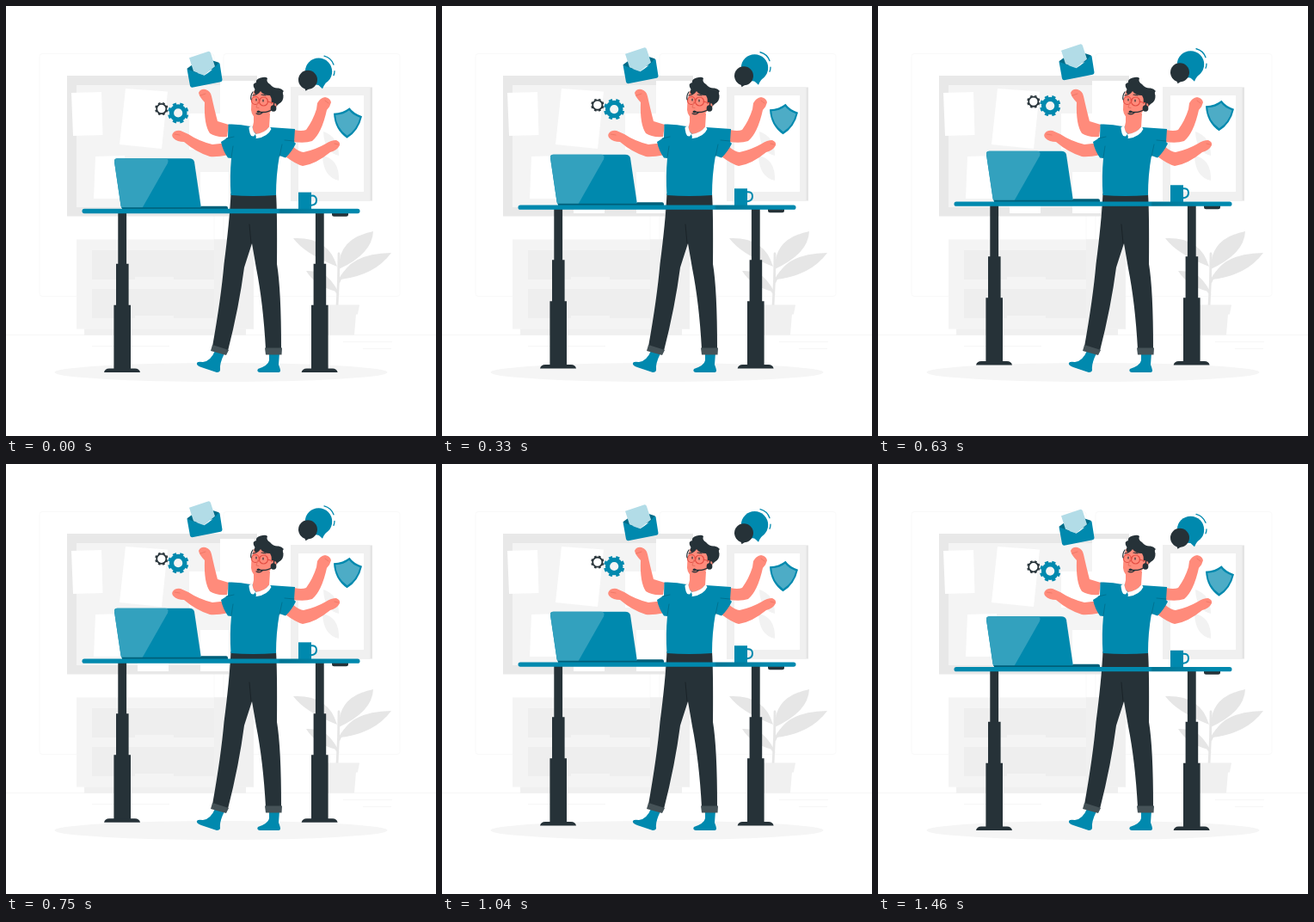
Recreate the animation shown at these times as an HTML page. Size 500x500 px, loop 1500 ms.

```html
<!DOCTYPE html>
<html lang="en">
<head>
<meta charset="utf-8">
<title>Standing desk</title>
<style>
  html, body { margin: 0; width: 100%; height: 100%; overflow: hidden; background: #fff; }
  svg { display: block; width: 100vw; height: 100vh; }
  .teal { fill: #0089ae; }
  .dark { fill: #263238; }
  .skin { fill: #ff8b7b; }
  .line { fill: none; stroke-linecap: round; stroke-linejoin: round; }
</style>
</head>
<body>
<svg viewBox="0 0 500 500">
  <defs>
    <linearGradient id="top" x1="0" x2="1">
      <stop offset=".705" stop-color="#0089ae"/>
      <stop offset=".715" stop-color="#007594"/>
      <stop offset=".92" stop-color="#0089ae"/>
    </linearGradient>
    <g id="leg" class="dark">
      <path d="M130.300 240h9.800v61h-9.800zM128 300h14.600v49H128zM125.400 348H145v75h-19.600z"/>
      <path d="M114 426.300q1-4.500 6-4.500h30q5 0 6 4.500z"/>
    </g>
  </defs>

  <g id="room">
    <g fill="none" stroke="#f7f7f7" stroke-width=".7">
      <path d="M42 55.500h197q3 0 3 3v276q0 3-3 3H42q-3 0-3-3v-276q0-3 3-3zM256 55.500h199q3 0 3 3v276q0 3-3 3H256q-3 0-3-3v-276q0-3 3-3z"/>
      <path d="M0 382.500h500M100 395.500h90M392 390.500h57M415 398.500h33" stroke="#f2f2f2"/>
    </g>
    <path fill="#e8e8e8" d="M71 81h221v163.500H71z"/>
    <path fill="#f4f4f4" d="M82 92h200v142H82z"/>
    <path fill="#fff" d="M76 101l35-1 1.500 50-34.500 1zM139 96l49 3.500-7 66.500-49-5zM104 175l34-1v50h-36zM153 193h36v48h-36zM226 193h33v48h-33zM213 125h45v42h-45zM249 87h40v52h-40z"/>
    <path fill="#e4e4e4" d="M331 94.500h95v132h-95z"/>
    <path fill="#f0f0f0" d="M331 94.500h92.500v132H331z"/>
    <path fill="#fff" d="M340 104h76v112h-76z"/>
    <path fill="#f2f2f2" d="M369 146q18 6 18 28-17-4-18-28zM368 174q20 4 19 29-18-4-19-29z"/>
    <path fill="#f4f4f4" d="M82 271.500h206v104H82zM91 375h188v7.500H91z"/>
    <path fill="#f0f0f0" d="M242 271.500h46v104h-46zM91 376h188v6.500H91z"/>
    <path fill="#eee" d="M100 284h142v34H100zM100 329h142v34H100z"/>
    <path fill="#f4f4f4" d="M150 315h45v3h-45zM150 360h45v3h-45z"/>
    <path class="line" stroke="#e6e6e6" stroke-width="2.800" d="M385 349q2-30 2-61M387 321q5-13 18-20M386 335q-8-18-24-26"/>
    <path fill="#e6e6e6" d="M387 306Q386 270 427 262 426 288 387 306zM389 318Q398 288 448 287 429 313 389 318zM385 303Q375 268 334 270 347 288 385 303zM384 332Q376 307 349 308 360 326 384 332z"/>
    <path fill="#f0f0f0" d="M358 347.500h53l-2 11H360zM362 358h45l-2 24.500h-41z"/>
    <ellipse cx="250" cy="426" rx="193.500" ry="11" fill="#f5f5f5"/>
  </g>

  <g id="person">
    <path class="teal" d="M243 401l11 3q-6 12-5 19 0 3-4 3-9-3-18-6-6-2-5-5 1-2 7-1 9-1 14-13zM306 403h12l-1 14q2 5 2 7 0 2-3 2h-21q-4-1-2-4 12-4 13-10z"/>
    <path class="dark" d="M261.500 218H314Q315.500 240 315 300 320 330 320 399H302Q299 345 291 305L286 276 277 304Q271 350 258 401L240 396Q250 340 253.500 300 260 250 261.500 218z"/>
    <path class="line" stroke="#1a2328" d="M285 276l-2-22"/>
    <path fill="#455257" d="M240 394l19 6-3 6-18-5zM301 397.500h20l-.5 8h-18.500z"/>

    <g class="skin">
      <path d="M224 101q2-5 8-4 6 2 7 8 4 18 7 29l13 4-2 14q-13 1-20-4-7-10-6-36-6-6-7-11z"/>
      <path d="M194 148q3-4 9-3l9 4q12 8 28 12l18-2 1 14q-15 3-22 2-16-5-30-17-8 0-12-4-3-3-1-6z"/>
      <path d="M362 113q3-6 9-7 6 1 7 6-1 5-5 9-6 27-17 36-8 3-22 1l1-14q9 2 14 0 8-11 12-24z"/>
      <path d="M372 160q6-4 12-4 5 2 4 6-3 6-11 8-17 14-32 16-8-2-20-11l8-12q8 7 13 7 14-3 26-10z"/>
    </g>
    <path class="line" stroke="#e8705f" stroke-width=".7" d="M226 104l6-2M196 149l6 1M371 110l4 3M382 160l4 1"/>

    <path class="teal" d="M258.500 137.500Q272 137 284 140L307 141 336 143 335 158 337 160Q332 170 325 176.500L318 174Q314 196 314 220 287 222 261.500 220 260 198 262 177L258 176.500Q252 168 250 158L258 153z"/>
    <path class="line" stroke="#006c89" stroke-width=".8" d="M256 154l9-2M262 176l2-13M335 157l-11-1M318 175l3-14"/>

    <path class="skin" d="M288 125h19l-1 16q-7 8-15 8l-5-5 2-9z"/>
    <path fill="#fff" d="M282.500 141l4-2q0 7 4 10 10-1 16-9l2 3q-4 9-17 11l-5-1q-4-5-4-12z"/>
    <path class="teal" d="M284 151l4 .5 2-2.500 1 4-2 2-4 1z"/>
    <path class="skin" d="M288 99Q299 95 309 104L310 119Q304 131 294 131 286 130 285 121 285 109 288 99z"/>
    <path class="dark" d="M291 103Q287 101 289.500 97 285 90 291 89 290 85 296 83.500 302 82 304 84 302 88 307 91 311 96 317 95.500 321 96 323 99 321 100 322.500 104 323 111 317 114L313 118 308 115Q310 109 307 104 299 104 296 99 293 103 291 103z"/>
    <circle class="skin" cx="311" cy="116" r="3.500"/>
    <g class="line" stroke="#e34d43" stroke-width="1.200">
      <circle cx="290" cy="110" r="4.500"/><circle cx="299.500" cy="111" r="5"/>
      <path d="M304 111l7 2M294 109l1 1"/>
    </g>
    <path class="line" stroke="#263238" stroke-width="1.200" d="M287 100q-3 4-2 9M287 104l4-1M297 103l5 1M291 108v2M299 109v2M291 125q4 2 7-1"/>
    <path class="line" stroke="#e8705f" d="M293 111l-2 7 3 .5"/>
    <path class="line" stroke="#263238" stroke-width="1.400" d="M310 120q-7 5-16 3M311 117q3-10-2-17"/>
    <ellipse class="dark" cx="311" cy="119" rx="3.400" ry="3.800"/>
    <ellipse class="dark" cx="293.500" cy="123" rx="2" ry="1.600"/>
  </g>

  <g id="float">
    <use href="#leg"/>
    <use href="#leg" x="229.600"/>
    <path class="dark" d="M379 240h19v2.500q0 2.500-2.500 2.500h-14q-2.500 0-2.500-2.500z"/>
    <path class="teal" d="M129.500 177.500H213q5 0 6 4l8 54h-92q-1 0-1.500-3L126 181.500q-.5-4 3.500-4z"/>
    <path fill="#33a1be" d="M129.500 177.500H185q5 0 3 5.500l-29.500 52H135q-1 0-1.500-3L126 181.500q-.5-4 3.500-4z"/>
    <path fill="#005f79" d="M135 234.500h91l1-1.500h29q2 0 2 2v2H135z"/>
    <path class="teal" d="M340 217h15v20h-15z"/>
    <path class="line" stroke="#0089ae" stroke-width="2" d="M355 221q6-.5 6 5t-6 6"/>
    <rect x="88.500" y="236.200" width="323" height="5.300" rx="2.600" fill="url(#top)"/>

    <g class="line">
      <circle cx="200.200" cy="124.800" r="7.700" stroke="#0089ae" stroke-width="5.200"/>
      <circle cx="200.200" cy="124.800" r="10.700" stroke="#0089ae" stroke-width="3" pathLength="16" stroke-dasharray="1 1" stroke-dashoffset="-.5" stroke-linecap="butt"/>
      <circle cx="180.800" cy="119.900" r="5.600" stroke="#263238" stroke-width="1.800"/>
      <circle cx="180.800" cy="119.900" r="6.900" stroke="#263238" stroke-width="1.500" pathLength="16" stroke-dasharray="1 1" stroke-dashoffset="-.5" stroke-linecap="butt"/>
    </g>

    <path fill="#006c89" d="M210.500 73l18-13 19 6 1 6-34 8z"/>
    <path fill="#b2dce7" d="M213 60.500l22.500-7.500q2 0 2.500 2l5 15.500-13 10.500-12-5z"/>
    <path class="teal" d="M210.500 73.500q10 4 20 7.500 10-6 16.500-14.500l1.500.5 3 19q0 2-2 2.500l-33 6.500q-2 0-2.500-2z"/>

    <circle class="teal" cx="363.500" cy="76.600" r="15.700"/>
    <path class="teal" d="M362 91l6 5.500q1-3 4-7z"/>
    <circle class="dark" cx="351" cy="86" r="11"/>
    <path class="dark" d="M347 95l1.500 4 6-4z"/>
    <path class="line" stroke="#0089ae" stroke-width="1.300" d="M370 58.500q8 2 11 10M382 76q0 3-1 5"/>

    <path class="teal" d="M399.500 118.500Q404 125 414 128.500 410 146 396.500 154 382 144 381 125 392 124.500 399.500 118.500z"/>
    <path fill="#4dacc6" d="M399 121.500Q403 127 411.500 130 408 144 396.700 151 384 142 383.200 127 393 126.500 399 121.500z"/>
  </g>
</svg>
<script>
  const PERIOD = 1500, LIFT = 10, LEAD = 25;
  const floating = document.getElementById('float');

  function draw() {
    const phase = (performance.now() + LEAD) % PERIOD / PERIOD;
    const rise = LIFT * (1 - Math.abs(1 - 2 * phase));
    floating.setAttribute('transform', `translate(0 ${-rise})`);
    requestAnimationFrame(draw);
  }
  draw();
</script>
</body>
</html>
```
